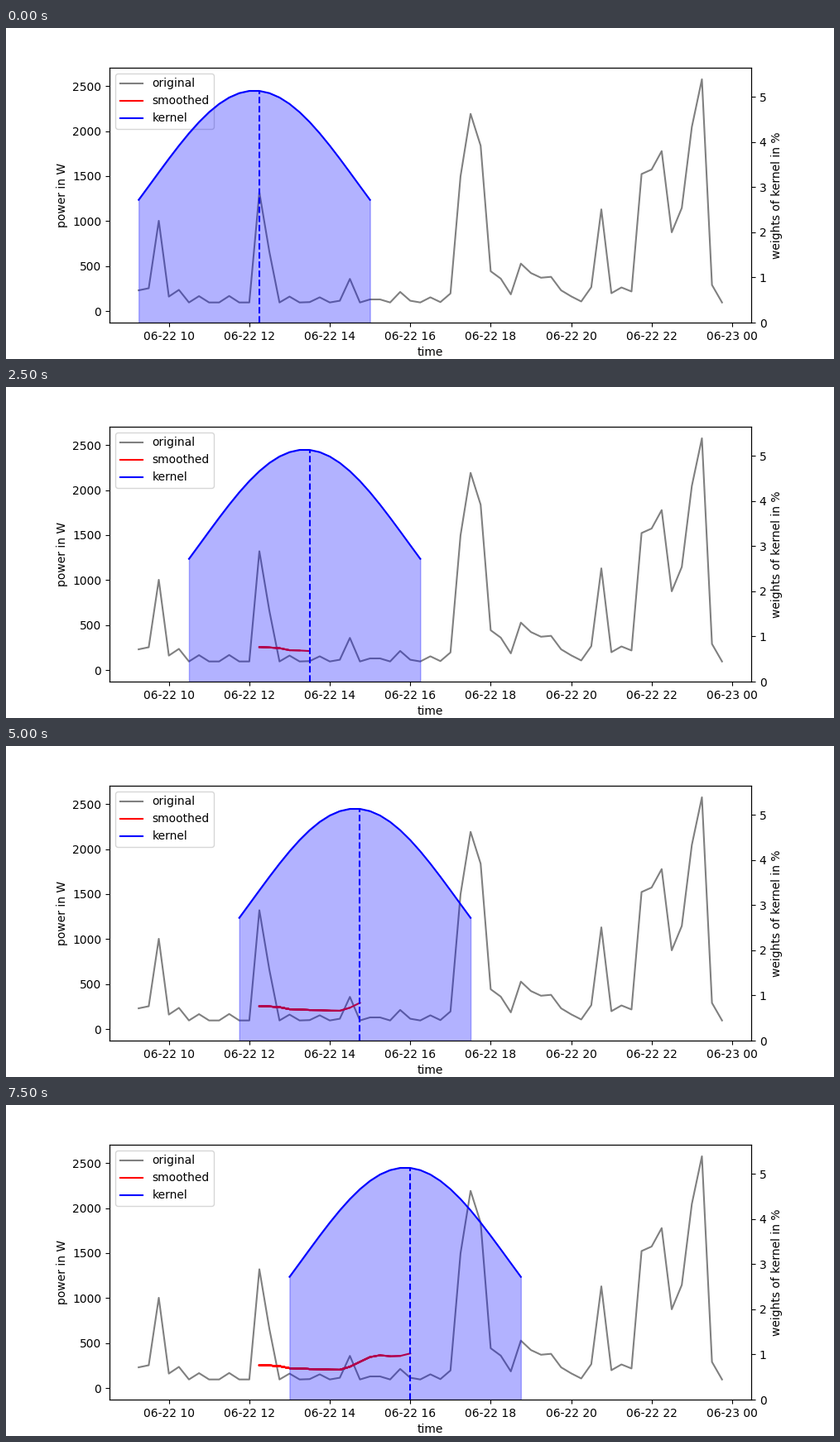
Animation of 1000x400 px, one loop 8000 ms. Source, as a matplotlib script:

```python
import numpy as np
import matplotlib.pyplot as plt
from matplotlib.animation import FuncAnimation
from matplotlib.lines import Line2D

FRAMES, STEP_MS = 16, 500
SAMPLES = 59
WIDTH = 24  # kernel length in samples, also its full width at half maximum

# Bursts of consumption on top of the base load: first sample -> watts.
BURSTS = {
    0: [230, 253, 1003],
    4: [235],
    12: [1320, 655],
    21: [357],
    26: [212],
    31: [195, 1497, 2192, 1838, 442, 360, 185],
    38: [527, 422, 370, 380, 230, 163, 106],
    45: [265, 1130, 198, 262, 217],
    50: [1523, 1573, 1778, 875, 1146, 2047, 2576, 290, 95],
}


def power_curve():
    """Cycling base load, replaced by the bursts where they occur."""
    i = np.arange(SAMPLES)
    watts = 95 + 72 * np.clip(np.cos(2 * np.pi * (i - 6.1) / 2.9), 0, 1)
    for start, burst in BURSTS.items():
        watts[start:start + len(burst)] = burst
    return watts


def gauss_kernel():
    """Gaussian weights in percent."""
    sigma = WIDTH / np.sqrt(8 * np.log(2))
    offset = np.arange(WIDTH) - (WIDTH - 1) / 2
    w = np.exp(-0.5 * (offset / sigma) ** 2)
    return 100 * w / w.sum()


power = power_curve()
weights = gauss_kernel()
time = np.datetime64("2020-06-22T09:15") + np.arange(SAMPLES) * np.timedelta64(15, "m")
smoothed = np.convolve(power, weights / 100, mode="valid")[:FRAMES]
centers = time[WIDTH // 2:WIDTH // 2 + FRAMES]

fig, ax = plt.subplots(figsize=(10, 4), dpi=100)
ax.plot(time, power, color="gray")
ax.set_ylim(-0.05 * power.max(), 1.05 * power.max())
ax.set_xlabel("time")
ax.set_ylabel("power in W")
ax.legend(
    [Line2D([], [], color=c) for c in ("gray", "red", "blue")],
    ["original", "smoothed", "kernel"], loc="upper left")

kernel_ax = ax.twinx()
kernel_ax.set_ylim(0, 1.1 * weights.max())
kernel_ax.set_ylabel("weights of kernel in %")


def kernel_artists(k):
    """Filled window, its outline and the centre line for one step."""
    span = time[k:k + WIDTH]
    fill = kernel_ax.fill_between(span, weights, color="blue", alpha=0.3)
    curve, = kernel_ax.plot(span, weights, color="blue")
    center, = kernel_ax.plot([centers[k]] * 2, [0, weights[WIDTH // 2]],
                             "--", color="blue")
    return fill, curve, center


kernels = [kernel_artists(k) for k in range(FRAMES)]
# Each step lays a longer line over the earlier ones, so older parts look bolder.
trails = [ax.plot(centers[:k + 1], smoothed[:k + 1], color="red")[0]
          for k in range(FRAMES)]


def update(k):
    for i in range(FRAMES):
        for artist in kernels[i]:
            artist.set_visible(i == k)
        trails[i].set_visible(0 < i <= k)
    return []


anim = FuncAnimation(fig, update, frames=FRAMES, init_func=lambda: update(0),
                     interval=STEP_MS, repeat=True, repeat_delay=0, blit=False)
plt.show()
```
